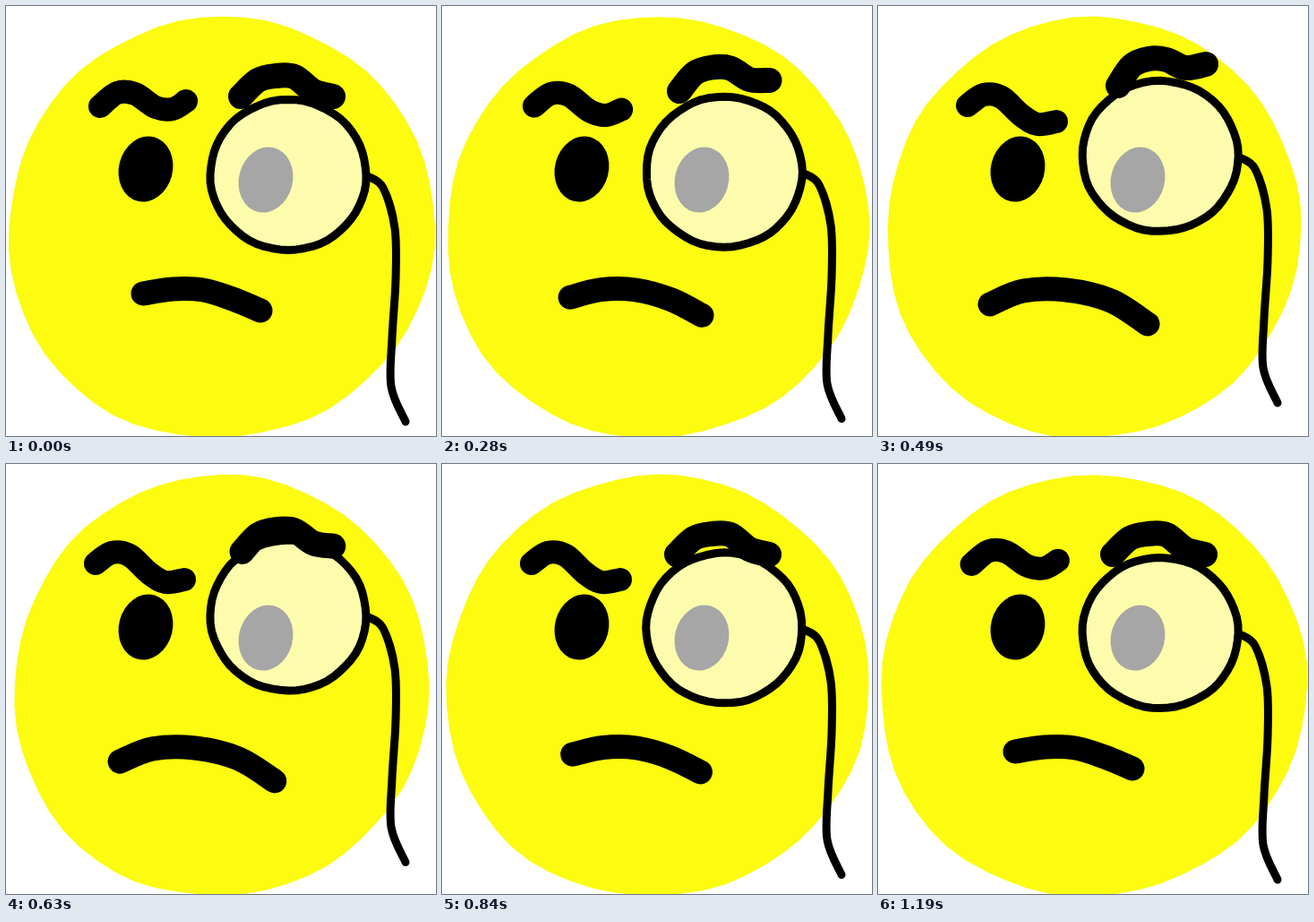
Animation, 480 px wide and 480 px high, one loop 1260 ms. Source, as an HTML page with a canvas:

```html
<!DOCTYPE html>
<html lang="en">
<head>
<meta charset="utf-8">
<title>Monocle face</title>
<style>
html, body { margin: 0; height: 100%; overflow: hidden; background: #fff; }
canvas { display: block; width: 100vmin; height: 100vmin; }
</style>
</head>
<body>
<canvas width="480" height="480"></canvas>
<script>
const ctx = document.querySelector('canvas').getContext('2d');
const STEP = 70, STEPS = 18;

// Brush strokes as x, y pairs: relaxed and tense pose
const leftBrow = {
  calm: [105, 112, 124, 97, 144, 98, 167, 113, 186, 115, 201, 106],
  tense: [100, 111, 118, 99, 138, 102, 160, 122, 178, 132, 199, 129]
};
const rightBrow = {
  calm: [262, 101, 281, 83, 301, 78, 322, 79, 343, 95, 365, 101],
  tense: [268, 89, 283, 67, 302, 59, 322, 60, 343, 69, 366, 65]
};
const mouth = {
  calm: [153, 321, 186, 316, 220, 317, 253, 327, 284, 340],
  tense: [125, 333, 162, 318, 210, 317, 260, 329, 301, 355]
};
const chain = [404, 190, 421, 203, 434, 248, 435, 305, 431, 370, 430, 425, 446, 464];

const lerp = (a, b, k) => a + (b - a) * k;
const blend = ({ calm, tense }, k) => calm.map((v, i) => lerp(v, tense[i], k));

function ease(t, from, to) {
  const k = Math.max(0, Math.min(1, (t - from) / (to - from)));
  return k * k * (3 - 2 * k);
}

// Rises from 0 to 1 between a and b, falls back between c and d
const swell = (t, a, b, c, d) => ease(t, a, b) - ease(t, c, d);

// Round shape with an uneven hand-drawn edge; bulge swells its lower left
function round(x, y, rx, ry, step, bulge, color) {
  ctx.beginPath();
  for (let i = 0; i < 60; i++) {
    const a = i * Math.PI / 30;
    const w = 1 + 0.003 * Math.sin(7 * a + step * 2) + 0.002 * Math.sin(13 * a + step * 5)
      + bulge * Math.max(0, Math.cos(a - 2.35)) ** 5;
    ctx.lineTo(x + rx * w * Math.cos(a), y + ry * w * Math.sin(a));
  }
  ctx.closePath();
  ctx.fillStyle = color;
  ctx.fill();
}

function eye(x, y, color) {
  ctx.beginPath();
  ctx.ellipse(x, y, 30, 37, 0.25, 0, 2 * Math.PI);
  ctx.fillStyle = color;
  ctx.fill();
}

// Smooth curve through all points
function brush(p, width) {
  const n = p.length / 2;
  const at = i => {
    const j = 2 * Math.max(0, Math.min(n - 1, i));
    return [p[j], p[j + 1]];
  };
  ctx.beginPath();
  ctx.moveTo(p[0], p[1]);
  for (let i = 0; i < n - 1; i++) {
    const [a, b, c, d] = [at(i - 1), at(i), at(i + 1), at(i + 2)];
    ctx.bezierCurveTo(
      b[0] + (c[0] - a[0]) / 6, b[1] + (c[1] - a[1]) / 6,
      c[0] - (d[0] - b[0]) / 6, c[1] - (d[1] - b[1]) / 6, c[0], c[1]);
  }
  ctx.lineWidth = width;
  ctx.stroke();
}

function draw(now) {
  const step = Math.floor(now / STEP) % STEPS;
  const frown = swell(step, 2, 7, 8, 14);
  const scowl = swell(step, 2, 6.5, 12, 18);
  const raise = swell(step, 2, 6, 7, 10);
  const lift = 21 * swell(step, 3, 7, 8, 14);

  ctx.fillStyle = '#fff';
  ctx.fillRect(0, 0, 480, 480);
  ctx.strokeStyle = '#000';
  ctx.lineCap = ctx.lineJoin = 'round';

  round(242, 246, lerp(237, 230, frown), 234, step, 0.04, '#fcfb10');
  eye(156, 182, '#000');
  round(315, 188.5 - lift, 87, 84, step, 0, '#fdfcac');
  ctx.lineWidth = 9;
  ctx.stroke();
  eye(290, 194, '#a6a6a6');
  brush(chain.map((v, i) => i % 2 ? v - lift : v), 9);
  brush(blend(leftBrow, scowl), 26);
  brush(blend(rightBrow, raise), 28);
  brush(blend(mouth, frown), 27);
  requestAnimationFrame(draw);
}
requestAnimationFrame(draw);
</script>
</body>
</html>
```
